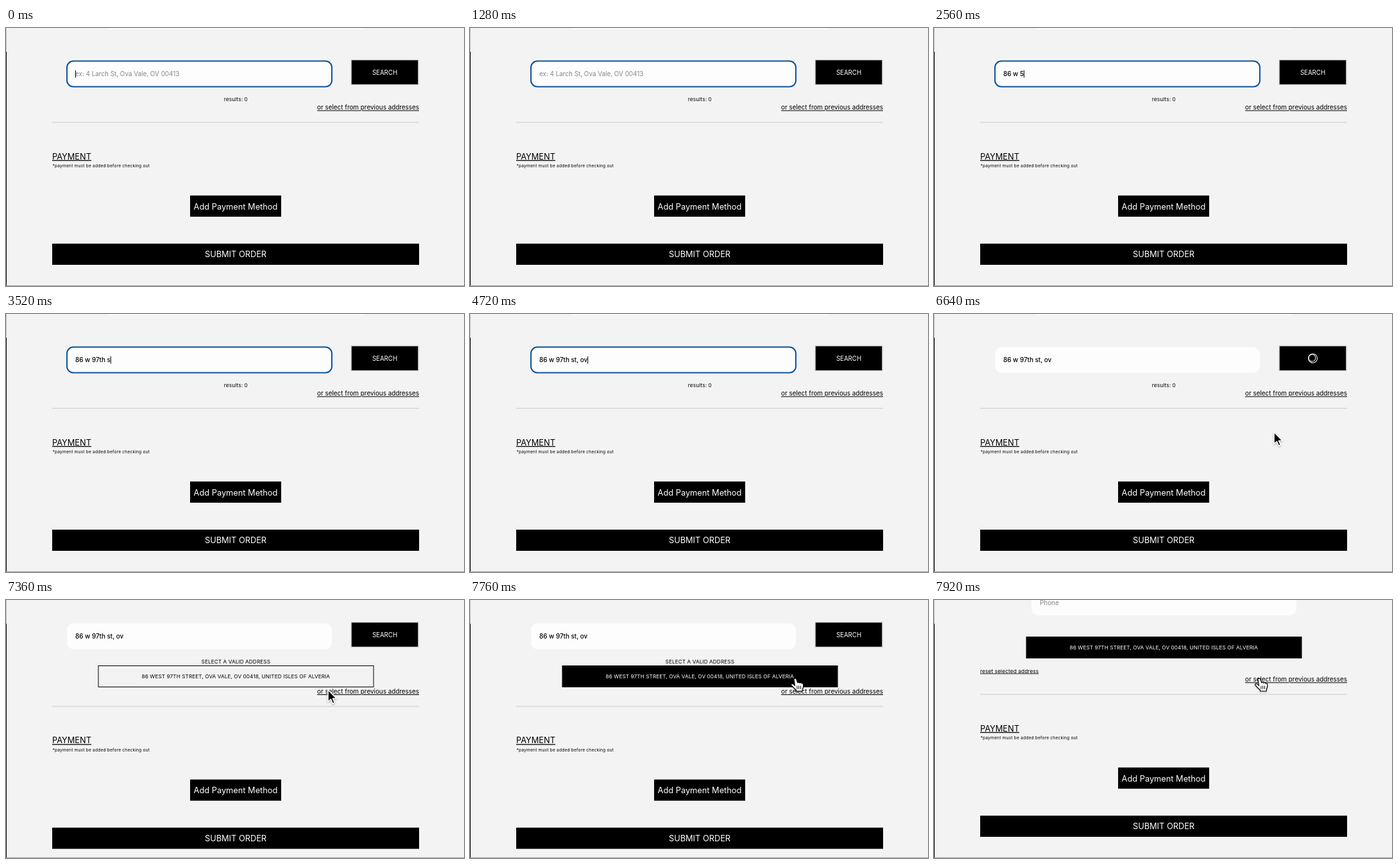
Recreate the animation shown at these times as an HTML page. Size 714 by 402 pixels, loop 8000 ms.

```html
<!DOCTYPE html>
<html lang="en">
<head>
<meta charset="utf-8">
<title>Checkout</title>
<style>
  html, body { margin: 0; height: 100%; overflow: hidden; background: #f3f3f3; }
  svg { display: block; width: 714px; height: 402px; }
  text { font-family: Inter, "Liberation Sans", sans-serif; white-space: pre; fill: #000; }
  .mid { text-anchor: middle; }
  .inv { fill: #fff; }
  .link { text-decoration: underline; text-decoration-thickness: 1px; }
  .big { font-size: 12.8px; }
  .field { font-size: 9.9px; font-weight: 500; }
  .hint { font-size: 9.9px; fill: #85858c; }
  .addr { font-size: 8.2px; letter-spacing: .1px; }
  .small { font-size: 8.2px; letter-spacing: .15px; }
</style>
</head>
<body>
<svg viewBox="0 0 714 402">
  <rect width="714" height="402" fill="#f3f3f3"/>

  <g id="card">
    <rect x="152" y="-40" width="413" height="64" rx="10" fill="#fdfdfd"/>
    <text class="hint" x="165" y="8">Phone</text>
  </g>

  <g id="search">
    <rect x="95" y="51.5" width="413" height="40" rx="10" fill="#fdfdfd"/>
    <rect id="ring" x="95" y="51.5" width="413" height="40" rx="10" fill="none" stroke="#0f529c" stroke-width="2"/>
    <text id="hint" class="hint" x="108" y="75">ex: 4 Larch St, Ova Vale, OV 00413</text>
    <text id="typed" class="field" x="108" y="75"></text>
    <rect id="caret" y="66" width="1" height="11.5"/>
    <rect x="538" y="49.5" width="105" height="39" stroke="#dfdae2" stroke-width="1.5"/>
    <text id="label" class="mid inv" x="590.5" y="72.6" font-size="9.7">SEARCH</text>
    <g id="spin" fill="none" stroke="#fff">
      <circle r="7" stroke-width="1"/>
      <circle cx="-.8" cy=".8" r="5.4" stroke-width="1"/>
    </g>
  </g>

  <text id="count" class="mid small" x="358.3" y="113.5">results: 0</text>

  <text id="pick" class="mid addr" x="358.3" y="98.5">SELECT A VALID ADDRESS</text>
  <g id="result">
    <rect id="box" x="144" y="102.5" width="429" height="33" stroke="#000"/>
    <text id="boxText" class="mid addr" x="358.3" y="122">86 WEST 97TH STREET, OVA VALE, OV 00418, UNITED ISLES OF ALVERIA</text>
  </g>
  <text id="reset" class="small link" x="72" y="113.5">reset selected address</text>

  <g id="lower">
    <text class="link" x="644" y="127.3" text-anchor="end" font-size="9.9">or select from previous addresses</text>
    <rect x="72" y="146" width="572" height="2" fill="#dedede"/>
    <text class="link" x="72" y="204.8" font-size="12.8">PAYMENT</text>
    <text x="72.5" y="217" font-size="6.6" letter-spacing=".2">*payment must be added before checking out</text>
    <rect x="287" y="261" width="142" height="33"/>
    <text class="mid inv big" x="358" y="282.7">Add Payment Method</text>
    <rect x="72" y="336" width="572" height="33"/>
    <text class="mid inv big" x="358" y="357.2">SUBMIT ORDER</text>
  </g>

  <rect width="1" height="37" fill="#bdbdbd"/>
  <rect y="37" width="1" height="365"/>
  <rect y="401" width="714" height="1" fill="#9a9a9a"/>

  <g id="arrow" stroke-linejoin="round" style="filter:drop-shadow(0 1px 1px #0005)">
    <path d="M0 0V18.5L4.4 14.6L7.3 21.4L10.4 20L7.5 13.5H13.3Z" stroke="#fff" stroke-width="1.6"/>
  </g>
  <g id="hand" stroke="#000" stroke-linejoin="round" stroke-linecap="round" style="filter:drop-shadow(0 1px 1px #0004)">
    <path d="M-2 1.8C-2 -.3 1.4 -.5 2 1.7L3.8 7C4.5 5.6 6.4 5.8 6.9 7.3C7.8 6.2 9.4 6.5 9.8 7.9C11 7.2 12.3 7.9 12.5 9.4C13 12.6 12.7 15 11.2 17V20H1.5V18.2C-1.2 16.2 -4 13.4 -6 10.7C-7.2 8.9 -5 7.6 -3.4 8.9L-.5 11.4Z" fill="#fff" stroke-width="1.2"/>
    <path d="M3 12V16.4M5.8 12V16.4M8.6 12V16.4" stroke-width="1"/>
  </g>
</svg>
<script>
const LOOP = 8000, STEP = 80;
const el = Object.fromEntries([...document.querySelectorAll('[id]')].map(e => [e.id, e]));

// Entry text: each key press at its time, '<' deletes
const keys = [
  [1360, '8'], [1520, '6'], [1680, ' '], [1920, 'w'], [2080, ' '], [2480, '5'],
  [2800, '<'], [2960, '9'], [3040, '7'], [3200, 't'], [3280, 'h'], [3440, ' '],
  [3520, 's'], [3680, 't'], [4160, ','], [4320, ' '], [4480, 'o'], [4560, 'v']
];

// Pointer path: time, x, y
const path = [
  [5280, 518, 112], [5520, 581, 60], [5840, 581, 60], [6000, 591, 14],
  [6160, 574, 62], [6400, 530, 184], [6880, 530, 184], [7040, 520, 185],
  [7200, 520, 185], [7360, 502, 140], [7520, 507, 122]
];

const BLUR = 5600, LOAD = 5920, FOUND = 6720, HOVER = 7440, CHOSEN = 7920;

const show = (e, on) => { e.style.display = on ? '' : 'none'; };
const move = (e, x, y, turn = 0) => e.setAttribute('transform', `translate(${x} ${y}) rotate(${turn})`);
const clamp = v => Math.max(0, Math.min(1, v));

function entry(t) {
  let text = '', last = -430;
  for (const [at, key] of keys) {
    if (at > t) break;
    text = key === '<' ? text.slice(0, -1) : text + key;
    last = at;
  }
  return { text, idle: t - last };
}

function pointer(t) {
  const i = path.findIndex(p => p[0] > t);
  if (i < 0) return path[path.length - 1].slice(1);
  const [t0, x0, y0] = path[i - 1], [t1, x1, y1] = path[i];
  const u = (t - t0) / (t1 - t0), s = u * u * (3 - 2 * u);
  return [x0 + (x1 - x0) * s, y0 + (y1 - y0) * s];
}

function draw(t) {
  const found = t >= FOUND, chosen = t >= CHOSEN, listing = found && !chosen;

  // Page layout
  show(el.card, !listing);
  move(el.card, 0, chosen ? 0 : -22.3);
  show(el.search, !chosen);
  move(el.search, 0, found ? -15 : 0);
  show(el.count, !found);
  show(el.pick, listing);
  show(el.result, found);
  move(el.result, 0, chosen ? -45 : 0);
  show(el.reset, chosen);
  move(el.lower, 0, listing ? 18.7 : 0);

  // Input
  const { text, idle } = entry(t);
  el.typed.textContent = text;
  show(el.hint, !text);
  show(el.ring, t < BLUR);
  show(el.caret, t < BLUR);
  el.caret.setAttribute('x', 108 + (text ? el.typed.getComputedTextLength() : 0));
  const p = idle % 1000;
  el.caret.style.opacity = p < 500 ? 1 : clamp((600 - p) / 100) + clamp((p - 900) / 100);

  // Button and result
  const loading = t >= LOAD && !found;
  show(el.label, !loading);
  show(el.spin, loading);
  move(el.spin, 590.5, 69, (t - LOAD) * .6);
  const dark = t >= HOVER;
  el.box.setAttribute('fill', dark ? '#000' : '#f3f3f3');
  el.boxText.style.fill = dark ? '#fff' : '#000';

  // Pointer
  const visible = t >= path[0][0];
  const [x, y] = visible ? pointer(t) : [0, 0];
  const overButton = x > 538 && x < 643 && y > 49 && y < 89;
  const hand = overButton && !loading || dark;
  show(el.hand, visible && hand);
  show(el.arrow, visible && !hand);
  move(el.hand, x, y);
  move(el.arrow, x, y);
}

const start = performance.now();
function tick() {
  const t = (performance.now() - start) % LOOP;
  draw(Math.floor(t / STEP) * STEP);
  requestAnimationFrame(tick);
}
tick();
</script>
</body>
</html>
```
